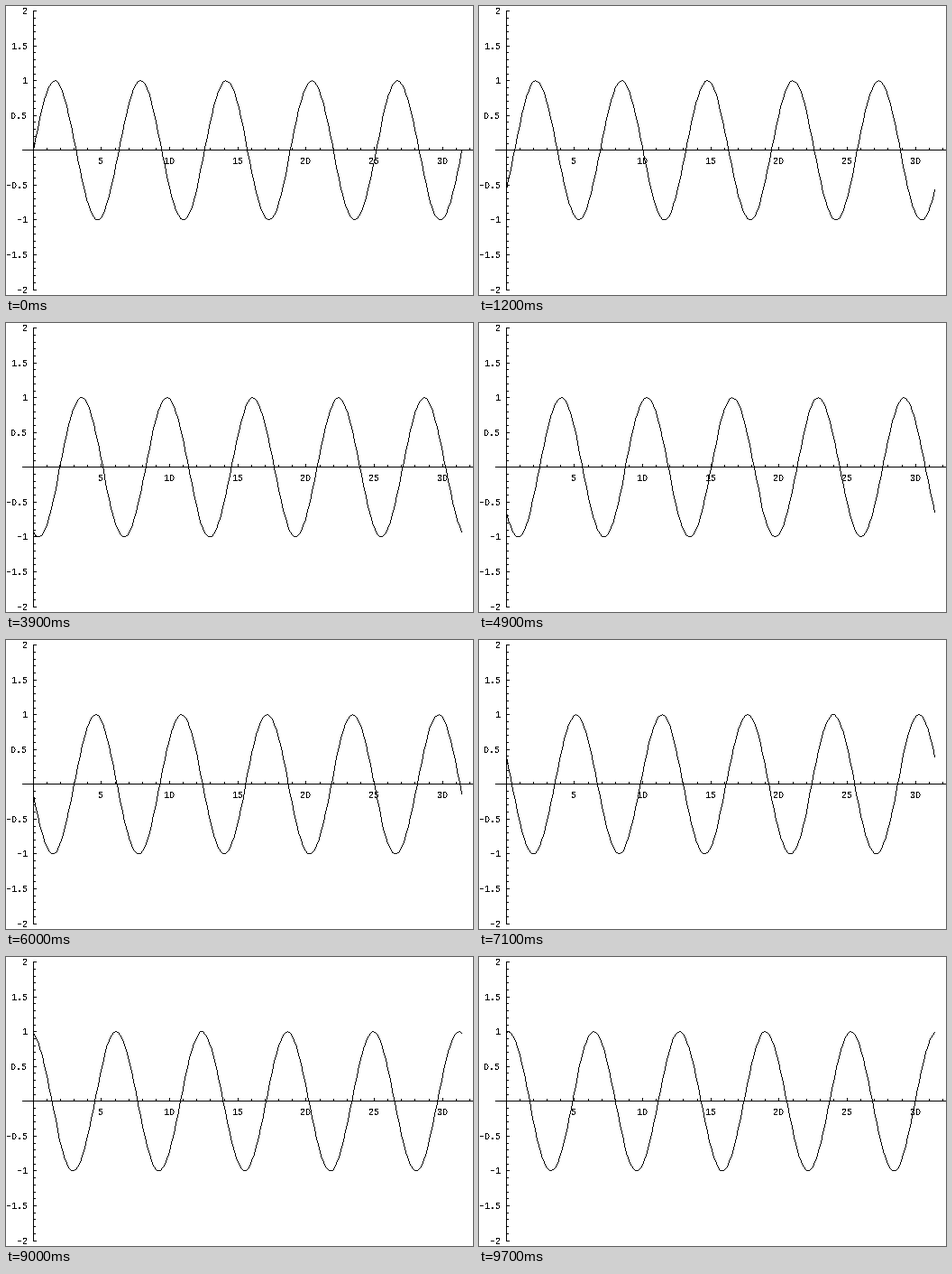
A matplotlib script for the animation above (9800 ms loop, 518 px wide and 320 px high).

```python
import math

import matplotlib.pyplot as plt
import numpy as np
from matplotlib.animation import FuncAnimation

W, H, DPI = 518, 320, 100
PX = 72 / DPI                      # one pixel in points
FRAMES, INTERVAL = 98, 100
PHASE_STEP = 0.05

X0, Y0 = 30.29, 159.83             # origin of the plot in pixels
X_UNIT, Y_UNIT = 15.13, 77.11
AXIS_COL, AXIS_ROW = 30, 159
MAJOR, MINOR = 3, 2                # tick lengths
CHAR_W = 6

fig = plt.figure(figsize=(W / DPI, H / DPI), dpi=DPI, facecolor="white")
ax = fig.add_axes([0, 0, 1, 1])
ax.axis("off")

canvas = np.full((H, W), 255, dtype=np.uint8)


def to_col(x):
    return np.floor(X0 + X_UNIT * x).astype(int)


def to_row(y):
    return np.floor(Y0 - Y_UNIT * y).astype(int)


def label(left, baseline, text):
    # The letter O gives an oval zero without the font's inner dot.
    text = text.replace("0", "O").replace("-", "\u2212")
    ax.text(left, baseline, text, family="Liberation Mono", fontsize=10 * PX,
            color="black", ha="left", va="baseline", antialiased=False)


def draw_x_axis():
    canvas[AXIS_ROW, 18:] = 0
    for n in range(1, 33):
        col = to_col(n)
        major = n % 5 == 0
        canvas[AXIS_ROW - (MAJOR if major else MINOR):AXIS_ROW, col] = 0
        if major:
            text = str(n)
            label(col - CHAR_W // 2 * len(text), 175, text)


def draw_y_axis():
    canvas[to_row(2):to_row(-2) + 1, AXIS_COL] = 0
    for n in range(-20, 21):
        row = to_row(n / 10)
        major = n % 5 == 0
        start = AXIS_COL + 1
        canvas[row, start:start + (MAJOR if major else MINOR)] = 0
        if major and n:
            text = f"{n / 10:g}"
            label(24 - CHAR_W * len(text), row + 4, text)


def draw_polyline(pixels, cols, rows):
    """Join whole-pixel points with lines one pixel thick."""
    points = np.column_stack([cols, rows])
    for p, q in zip(points, points[1:]):
        steps = abs(q - p).max()
        line = np.floor(np.linspace(p, q, steps + 1) + 0.5).astype(int)
        pixels[line[:, 1], line[:, 0]] = 0


t = np.linspace(0, 10 * math.pi, 193)
wave_cols = to_col(t)

draw_x_axis()
draw_y_axis()
picture = ax.imshow(canvas, cmap="gray", vmin=0, vmax=255, aspect="auto",
                    extent=(0, W, H, 0), interpolation="nearest")


def update(frame):
    pixels = canvas.copy()
    draw_polyline(pixels, wave_cols, to_row(np.sin(t - PHASE_STEP * frame)))
    picture.set_data(pixels)
    return picture,


anim = FuncAnimation(fig, update, frames=FRAMES, interval=INTERVAL,
                     repeat=True, repeat_delay=0, blit=False)
plt.show()
```
